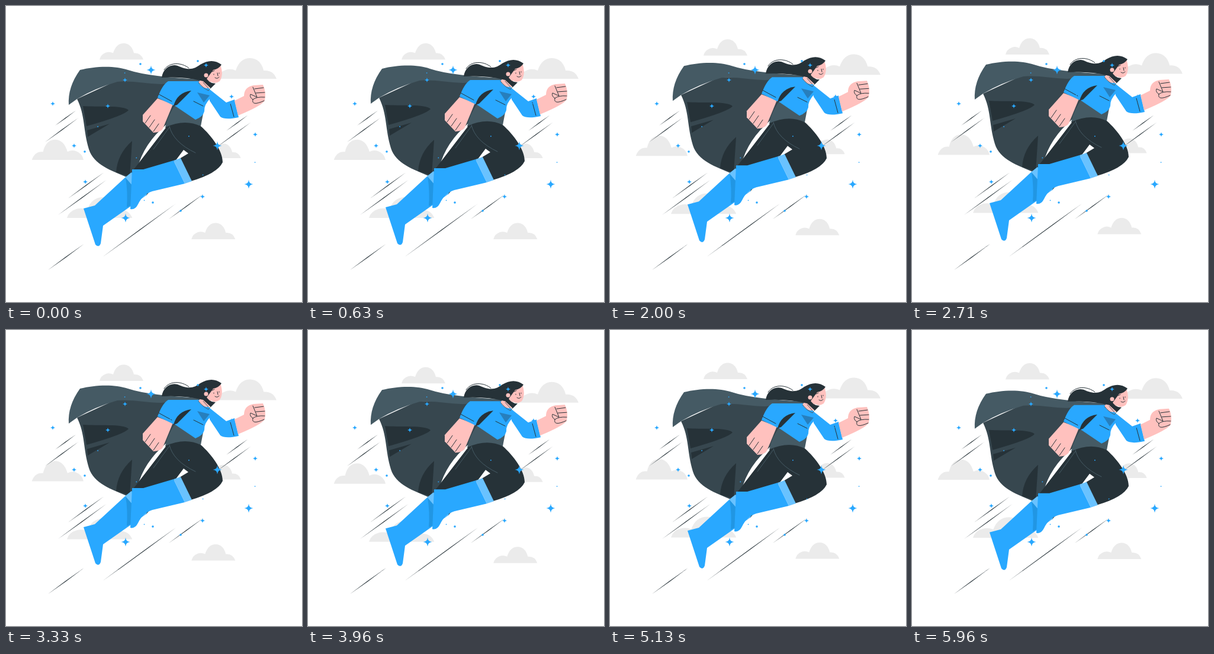
Animation, 500 px wide and 500 px high, one loop 6000 ms. Source, as an HTML page:

```html
<!DOCTYPE html>
<html lang="en">
<head>
<meta charset="utf-8">
<title>Flying heroine</title>
<style>
html, body { margin: 0; width: 100%; height: 100%; overflow: hidden; background: #fff; }
svg { display: block; width: 100vw; height: 100vh; }
.dark { fill: #263238; }
.cape { fill: #37474f; }
.gray { fill: #455a64; }
.blue { fill: #29a8ff; }
.pale { fill: #69c2ff; }
.skin { fill: #ffc1be; }
.ink, .seam { fill: none; stroke: #263238; stroke-linecap: round; stroke-linejoin: round; }
.seam { stroke: #455a64; }
</style>
</head>
<body>
<svg viewBox="0 0 500 500">
  <defs>
    <path id="puff" d="M0 0Q2 -9 11 -12Q17 -14 23 -11Q28 -27.500 41 -27.500Q54 -27 58 -11Q70 -12 74 0Z"/>
  </defs>
  <g id="clouds" fill="#ebebeb">
    <use href="#puff" transform="translate(158 90.500)"/>
    <use href="#puff" transform="translate(313.300 394)"/>
    <use href="#puff" transform="translate(357 123) scale(1.350 1.270)"/>
    <use href="#puff" transform="translate(131 260) scale(-1.180 1.250)"/>
    <use href="#puff" transform="translate(330 257) scale(.9)"/>
    <use href="#puff" transform="translate(103 358) scale(1.490 1.270)"/>
  </g>
  <g id="streaks" class="dark"></g>

  <g id="hero">
    <!-- cape -->
    <path class="cape" d="M120 157L185 127L325 127L271 200Q233 232 222 274L206 290C178 278 148 268 140 242C130 210 134 185 120 157Z"/>
    <path class="gray" d="M106 167Q104 137 125 108C150 102 182 100 206 108Q242 120 333 124V130Q290 129 262 132C235 131 214 126 188 128Q150 139 120 157Z"/>
    <path class="dark" d="M130 169C152 171 200 167 207 176Q200 185 136 203ZM137 210L175 199L138 221ZM186 281Q188 250 213 228L209 288Z"/>

    <!-- rear leg -->
    <path class="dark" d="M272 203L219 272L207 286L237 320L288 259L300 243L315 212Z"/>
    <path class="blue" d="M202 289L150 337L131 342L151 403Q157 409 160 401L164 371L238 319L212 281Z"/>
    <path class="pale" d="M201 290L212 281L238 318L232 323Z"/>
    <path fill="#2196e3" d="M202 290L213 303L221 332L204 340Q206 315 202 290Z"/>

    <!-- front leg -->
    <path class="dark" d="M269 205C281 191 318 192 329 203C347 219 366 244 366 264Q357 283 312 296L293 258L308 249L300 243L280 218Z"/>
    <path class="blue" d="M283 261L232 276H213L210 343Q218 345 223 335Q231 318 247 313L302 300Z"/>
    <path class="pale" d="M283 261L295 257L314 296L302 300Z"/>
    <path class="seam" d="M276 205L249 242M276 203Q282 230 320 248"/>

    <!-- torso and arms -->
    <path class="gray" d="M269 205Q274 182 288 165L333 182L329 203Q302 190 269 205Z"/>
    <path class="blue" d="M274 127L325 127Q346 132 346 155Q334 167 335 178Q333 187 320 192L283 167Z"/>
    <path class="blue" d="M343 140L372 163L386 158L393 188Q370 193 362 187L344 160Z"/>
    <path class="skin" d="M386 160L402 152Q402 137 418 134L434 133Q440 145 437 160Q431 169 392 185Z"/>
    <path class="skin" d="M256 156L231 184L231 195L249 214Q262 213 265 207L282 166Z"/>
    <path class="blue" d="M274 127Q264 133 256 155L283 168L301 147Z"/>
    <path class="dark" d="M283 169Q289 146 313 143L289 167Z"/>
    <path class="ink" d="M258 149L280 161M379 165L385 187M317 161L333 169"/>
    <path class="ink" d="M417 137L424 154L413 149Q411 154 417 158Q423 153 437 154M420 140L435 138M422 147L437 146M417 158Q414 170 436 160"/>
    <path class="ink" id="fingers"/>
    <path fill="#277fbd" d="M323 146L344 151L334 163Z"/>

    <!-- head -->
    <path class="skin" d="M333 119H347L345 138Q333 142 325 129Z"/>
    <path class="seam" d="M325 129Q333 139 342 143L347 136M333 129L342 139"/>
    <path class="skin" d="M340 104Q350 92 362 99Q368 116 361 127Q350 135 340 122Z"/>
    <path class="dark" d="M337 119Q342 131 354 131L346 139L333 127Z"/>
    <path class="dark" d="M263 121C265 106 278 97 290 101C309 110 319 106 328 99Q348 87 364 99Q360 106 350 108L339 123L333 127Q300 119 263 121Z"/>
    <circle class="skin" cx="338" cy="117" r="3.500"/>
    <path class="ink" d="M267 108C276 94 297 95 309 105M348 111L352 109M351 115v1M360 113v1M357 113L358 118M353 121Q357 124 360 120"/>
  </g>
  <g id="sparks" class="blue"></g>
</svg>
<script>
const $ = id => document.getElementById(id);

$('fingers').setAttribute('d', [0, 1, 2].map(i => `M${235 + 7 * i} ${198 + 7 * i}l9 -13`).join(''));

// A slim lens rising to the right from its lower tip
const streak = (x, y, length) =>
  `<path transform="translate(${x} ${y}) rotate(-36)" d="M0 0Q${length / 2} -1.2 ${length} 0Q${length / 2} 1.2 0 0"/>`;
const pair = (x, y, length) => streak(x, y, length) + streak(x - 17, y + 28, length + 27);
$('streaks').innerHTML =
  pair(83, 202, 43) + pair(105, 325, 74) + pair(372, 211, 45) +
  streak(163, 424, 153) + streak(71, 446, 75) + streak(275, 360, 72);

const star = r => ([x, y]) => {
  const k = r * .08;
  return `<path transform="translate(${x} ${y})" d="M0 ${-r}Q${k} ${-k} ${r} 0Q${k} ${k} 0 ${r}Q${-k} ${k} ${-r} 0Q${-k} ${-k} 0 ${-r}"/>`;
};
const dot = r => ([x, y]) => `<circle cx="${x}" cy="${y}" r="${r}"/>`;

const big = [[245, 108], [357, 236], [410, 301], [202, 358]];
const small = [[201, 125], [79, 165], [172, 169], [115, 236], [134, 297], [421, 217], [381, 153], [338, 100], [332, 322]];
const dots = [[227, 98], [324, 93], [133, 246], [248, 332], [295, 346]];
// Tiny specks spread out along a sunflower spiral
const specks = Array.from({ length: 9 }, (_, i) => {
  const r = 55 * Math.sqrt(i + .5);
  return [270 + r * Math.cos(2.4 * i), 220 + .8 * r * Math.sin(2.4 * i)];
});
$('sparks').innerHTML = [
  ...big.map(star(7.5)), ...small.map(star(4.2)), ...dots.map(dot(1.8)), ...specks.map(dot(.9))
].join('');

// Linear rise and fall by 10 units
const float = (t, period) => -10 * (1 - Math.abs(1 - 2 * (t % period) / period));
const lift = (id, y) => $(id).setAttribute('transform', `translate(0 ${y.toFixed(2)})`);

function draw() {
  const t = performance.now() % 6000;
  lift('hero', float(t, 6000));
  lift('clouds', t < 1000 ? 0 : float(t - 1000, 3000)); // clouds start a second late
  requestAnimationFrame(draw);
}
draw();
</script>
</body>
</html>
```
